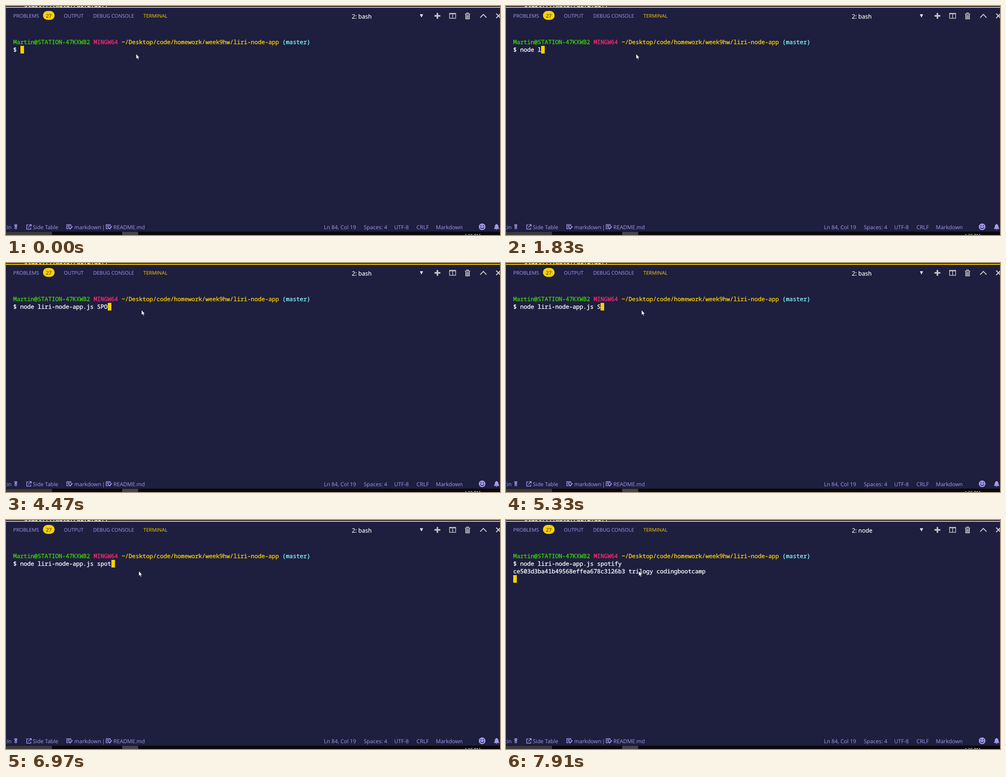
Recreate the animation shown at these times as an HTML page. Size 1097 by 511 pixels, loop 8 s.

```html
<!DOCTYPE html>
<html lang="en">
<head>
<meta charset="utf-8">
<title>Terminal session</title>
<style>
  html, body { margin: 0; width: 100%; height: 100%; overflow: hidden; background: #1e1e3f; }
  svg { display: block; width: 100%; height: 100%; }
  text { white-space: pre; text-rendering: geometricPrecision; }
  .term, .term tspan { fill: currentColor; stroke: currentColor; stroke-width: .35; }
  .term { font: 12.957px "Noto Sans Mono", monospace; color: #fff; }
  .ui { font: 12.06px "Open Sans", sans-serif; fill: #a599e9; }
  .tabs { font-size: 11.1px; }
  .line { fill: none; stroke: #c5c5c5; stroke-width: 2; }
  .lilac { fill: none; stroke: #a599e9; stroke-width: 1.5; }
  .yellow { fill: #fad000; }
  #shell { font-size: 13.1px; fill: #fff; stroke: #fff; stroke-width: .25; }
</style>
</head>
<body>
<svg viewBox="0 0 1097 511">
  <defs>
    <clipPath id="editorEdge"><rect width="1097" height="2"/></clipPath>
    <g id="checkedFile" class="lilac">
      <path d="M10 5V1H1V10H5M3 3.5H8M3 6H7"/>
      <path d="M5.5 7.5L8.5 10.5L13.5 4.5" stroke-width="2"/>
    </g>
  </defs>

  <rect width="1097" height="511" fill="#1e1e3f"/>
  <text class="term" x="25" y="1.5" clip-path="url(#editorEdge)">* start![](motif/gif2.gif)</text>
  <rect y="2" width="1097" height="2" class="yellow"/>

  <g class="ui tabs">
    <text x="16" y="26">PROBLEMS</text>
    <rect x="82" y="11" width="26" height="20" rx="10" class="yellow"/>
    <text x="95" y="25.5" text-anchor="middle" style="fill:#1e1e3f">27</text>
    <text x="128.5" y="26">OUTPUT</text>
    <text x="193.5" y="26">DEBUG CONSOLE</text>
    <text x="305" y="26" class="yellow">TERMINAL</text>
  </g>
  <text id="shell" class="ui" x="768" y="27.5"></text>
  <path d="M919 18.5H926.2L922.6 25.5Z" fill="#fff"/>

  <g class="line">
    <path d="M951.5 22H964.5M958 15.5V28.5" stroke-width="3.4"/>
    <path d="M985 17V27.5H998.5V17M991.8 17V27" stroke-width="1.5"/>
    <path d="M984.2 17H999.2" stroke-width="2.8"/>
    <path d="M1019 18H1031M1023 17V15.5H1027V17" stroke-width="1.6"/>
    <path d="M1021 19V28.5H1029V19M1023.7 20V27M1026.3 20V27" stroke-width="1.8"/>
    <path d="M1053 26L1060 18.7L1067 26"/>
    <path d="M1088.5 17L1098.5 27M1098.5 17L1088.5 27" stroke-width="2.4"/>
  </g>

  <g class="term">
    <text x="16" y="85"><tspan color="#3ad900">Martin@STATION-47KXWB2</tspan> <tspan color="#ff2c70">MINGW64</tspan> <tspan color="#fad000">~/Desktop/code/homework/week9hw/liri-node-app</tspan> <tspan color="#80fcff">(master)</tspan></text>
    <text id="command" x="16" y="102"></text>
    <text id="output" x="16" y="119"></text>
  </g>
  <rect id="caret" width="8" height="17" class="yellow"/>
  <path id="pointer" d="M0 0V11L2.5 8.8L4.3 12.8L6 12L4.3 8.2H7.5Z" fill="#fff" stroke="#111" stroke-width=".6"/>

  <g class="ui">
    <text x="12.5" y="497.5" text-anchor="end">tin</text>
    <path class="lilac" d="M19.5 488V491L21.7 492.7L24 491V488ZM21.7 488V492"/>
    <circle class="lilac" cx="21.7" cy="495.3" r="2"/>
    <path class="lilac" d="M50 488.5H46V498H55V494.5M51.5 487.7H56V492M56 487.7L49.5 494.2"/>
    <text x="59.5" y="497.5">Side Table</text>
    <use href="#checkedFile" x="134" y="487"/>
    <text x="151.5" y="497.5">markdown</text>
    <text x="213.2" y="497.5">|</text>
    <use href="#checkedFile" x="221.5" y="487"/>
    <text x="238.5" y="497.5">README.md</text>
    <text x="706" y="497.5">Ln 84, Col 19</text>
    <text x="794.5" y="497.5">Spaces: 4</text>
    <text x="862" y="497.5">UTF-8</text>
    <text x="911.5" y="497.5">CRLF</text>
    <text x="954.5" y="497.5">Markdown</text>
    <circle cx="1057.3" cy="492.7" r="7.4"/>
    <g fill="#1e1e3f"><circle cx="1054.7" cy="490.5" r="1.2"/><circle cx="1060" cy="490.5" r="1.2"/></g>
    <path d="M1053 494Q1057.3 499.5 1061.6 494" fill="none" stroke="#1e1e3f" stroke-width="1.4"/>
    <path d="M1083 497.5Q1085.5 495 1085.5 491.5Q1086 487.5 1089.5 486.5Q1093 487.5 1093.5 491.5Q1093.5 495 1096 497.5ZM1087.5 498.3H1091.5Q1089.5 501 1087.5 498.3Z"/>
  </g>

  <rect y="503.5" width="1097" height="8" fill="#090909"/>
  <rect y="504" width="102" height="7" fill="#3b3b3b"/>
  <rect x="258" y="504" width="35.5" height="7" fill="#454545"/>
  <text class="ui" x="1017.5" y="515.5" style="font-size:9.7px;fill:#fff">4:35 PM</text>
</svg>

<script>
const LOOP = 8000, LEFT = 16, TOP = 72, CELL = 7.774, ROW = 17;
const PROMPT = "$ ", SCRIPT = "node liri-node-app.js ";
const OUTPUT = "ce503d3ba41b49568effea678c3126b3 trilogy codingbootcamp";

const typed = [
  [0, ""], [520, "n"], [580, "no"], [820, "nod"], [1140, "node"], [1680, "node "], [1830, "node l"],
  [3460, SCRIPT], [4160, SCRIPT + "S"], [4320, SCRIPT + "SP"], [4470, SCRIPT + "SPO"], [4700, SCRIPT + "SPOT"],
  [5010, SCRIPT + "SPO"], [5160, SCRIPT + "SP"], [5330, SCRIPT + "S"], [5880, SCRIPT],
  [6360, SCRIPT + "s"], [6500, SCRIPT + "sp"], [6650, SCRIPT + "spo"], [6970, SCRIPT + "spot"],
  [7050, SCRIPT + "spoti"], [7280, SCRIPT + "spotif"], [7430, SCRIPT + "spotify"]
];
const pointerStops = [[0, 289, 107], [4240, 301, 105], [6190, 298, 110], [6280, 295, 114]];
const ENTER = 7750, RENAME = 7830, PRINT = 7910;

const byId = id => document.getElementById(id);
const [shell, command, output, caret, pointer] =
  ["shell", "command", "output", "caret", "pointer"].map(byId);
const latest = (steps, t) => steps.filter(([start]) => start <= t).pop();

function draw(t) {
  const line = PROMPT + latest(typed, t)[1];
  command.textContent = line;
  output.textContent = t >= PRINT ? OUTPUT : "";
  shell.textContent = t >= RENAME ? "2: node" : "2: bash";

  const row = t >= PRINT ? 3 : t >= ENTER ? 2 : 1;
  const column = row === 1 ? line.length : 0;
  caret.setAttribute("x", Math.round(LEFT + column * CELL));
  caret.setAttribute("y", TOP + row * ROW);

  const [, x, y] = latest(pointerStops, t);
  pointer.setAttribute("transform", `translate(${x} ${y})`);
}

function tick() {
  draw(performance.now() % LOOP);
  requestAnimationFrame(tick);
}
tick();
</script>
</body>
</html>
```
